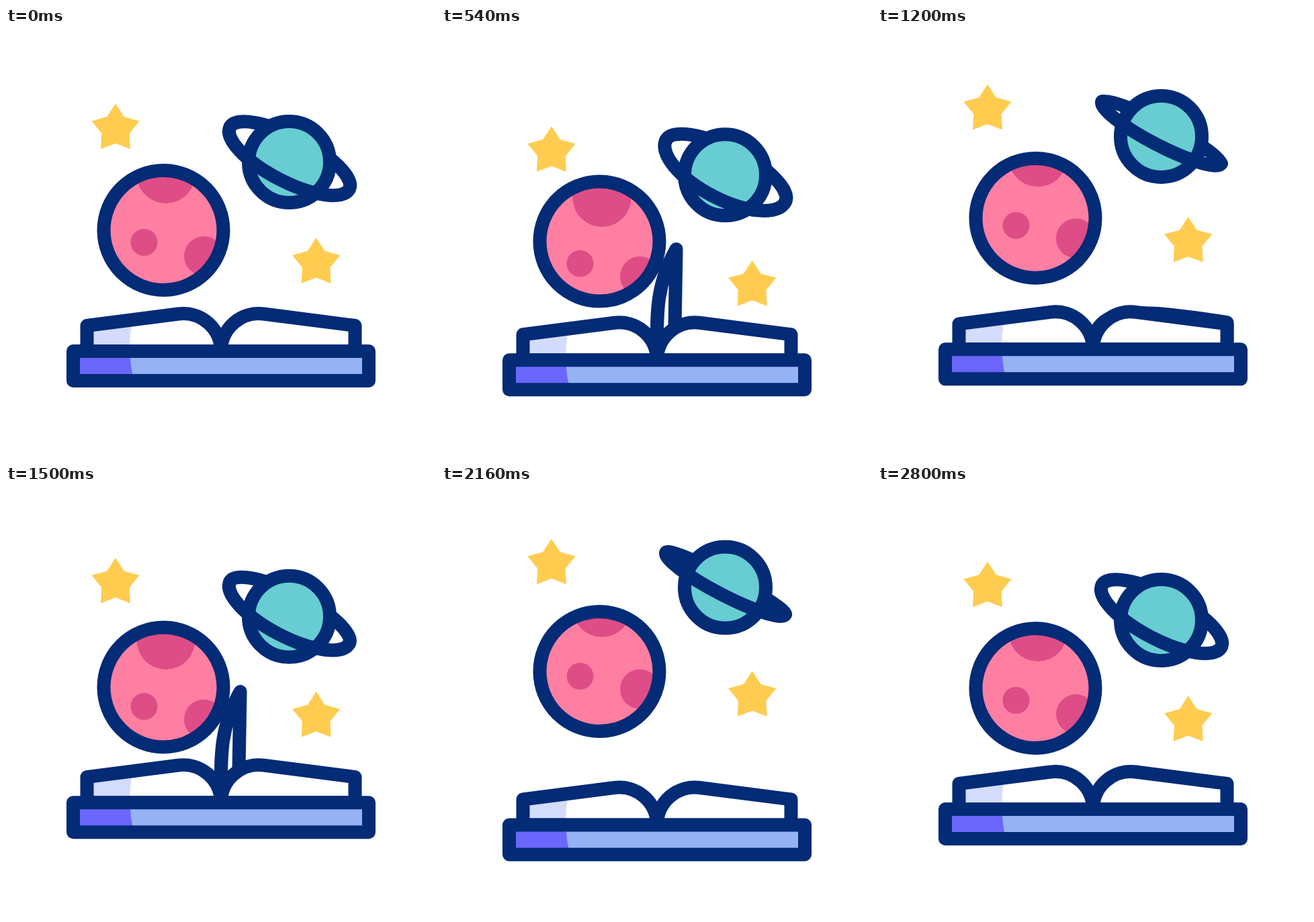
An HTML page for the animation above (2960 ms loop, 640x640 px).

```html
<!DOCTYPE html>
<html lang="en">
<head>
<meta charset="utf-8">
<title>Space book</title>
<style>
  html, body { margin: 0; width: 100%; height: 100%; overflow: hidden; background: #fff; }
  svg { display: block; width: 100%; height: 100%; }
  .line { stroke: #032b76; stroke-width: 20; stroke-linejoin: round; stroke-linecap: round; }
  .none { fill: none; }
  .white { fill: #fff; }
  .star { fill: #ffcc50; }
  .spot { fill: #de4d86; }
</style>
</head>
<body>
<svg viewBox="0 0 640 640">
  <defs>
    <clipPath id="disc"><circle cx="234.5" cy="301" r="82"/></clipPath>
    <path id="page" d="M120.5 481V443L256.7 425.5A56 56 0 0 1 320 481Z"/>
  </defs>

  <polygon id="starL" class="star"/>
  <polygon id="starR" class="star"/>

  <g id="saturn">
    <g class="line none" transform="translate(422.2 193.5) rotate(27.5)">
      <path id="ringBack"/>
    </g>
    <circle cx="421.5" cy="199.5" r="60.5" class="line" fill="#67cdd2"/>
    <g class="line none" transform="translate(422.2 193.5) rotate(27.5)">
      <path id="ringFront"/>
    </g>
  </g>

  <g id="planet">
    <circle cx="234.5" cy="301" r="89" fill="#ff7fa2"/>
    <g clip-path="url(#disc)">
      <circle id="spotTop" class="spot" cx="238" cy="217.5" r="43.5"/>
      <circle id="spotLeft" class="spot" cx="205.5" cy="319" r="20"/>
      <circle id="spotRight" class="spot" cx="294.5" cy="339.5" r="29.5"/>
    </g>
    <circle cx="234.5" cy="301" r="89" class="line none"/>
  </g>

  <g id="book">
    <path id="leaf" class="line white"/>
    <use href="#page" class="white"/>
    <path d="M120.5 481V443L187 434V443Q183.5 462 184.7 481Z" fill="#d3dcfd"/>
    <use href="#page" class="line none"/>
    <use href="#page" class="line white" transform="matrix(-1 0 0 1 640 0)"/>
    <rect x="100" y="481" width="440" height="44" fill="#95b2f4"/>
    <path d="M100 481H185V491Q185.5 504 188.3 515V525H100Z" fill="#6a66fb"/>
    <rect x="100" y="481" width="440" height="44" class="line none"/>
  </g>
</svg>

<script>
const LOOP = 2960, END = 2800;
const BEATS = [190, 470, 970, 1600, 2090, 2730];   // rest, low, high, dip, high, rest
const BOOK = [[190, 0], [370, 14.2], [1790, -12.5], [2080, 26], [2480, 0]];
const FLIPS = [210, 1170], FLIP_TIME = 660;

// Turning page: curve handle, far corner, lower corner, base
const RIGHT = [[380, 420], [519.5, 443], [519.5, 481], [340, 481]];
const UP = [[317, 372], [350.3, 316], [350.3, 316], [346, 481]];
const LEFT = RIGHT.map(([x, y]) => [640 - x, y]);

const el = id => document.getElementById(id);
const mix = (a, b, k) => a + (b - a) * k;
const ease = k => 0.5 - 0.5 * Math.cos(Math.PI * k);
const shift = (id, y) => el(id).setAttribute('transform', `translate(0 ${y.toFixed(2)})`);

// Sine-eased value through [time, value] keys
function through(keys, t) {
  const i = keys.findIndex(([time]) => t < time);
  if (i === 0) return keys[0][1];
  if (i < 0) return keys[keys.length - 1][1];
  const [[t0, a], [t1, b]] = [keys[i - 1], keys[i]];
  return mix(a, b, ease((t - t0) / (t1 - t0)));
}

// Floating motion: later parts follow the same beats with a delay
function float(t, delay, low, high, dip = 0, rest = 0) {
  const values = [rest, low, high, dip, high, rest];
  return through(BEATS.map((b, i) => [Math.min(b + delay, END), values[i]]), t);
}

function starPoints(cx, cy) {
  return Array.from({ length: 10 }, (_, i) => {
    const r = i % 2 ? 21.8 : 37.4, a = Math.PI * (i / 5 - 0.5);
    return (cx + r * Math.cos(a)).toFixed(2) + ',' + (cy + r * Math.sin(a)).toFixed(2);
  }).join(' ');
}

function drawRing(t) {
  const back = float(t, 105, 34, 10, 34, 32);
  const front = float(t, 105, 42, 17, 42, 35);
  el('ringBack').setAttribute('d', `M-100 0A100 ${back} 0 0 1 100 0`);
  el('ringFront').setAttribute('d', `M100 0A100 ${front} 0 0 1 -100 0`);
}

// The far corner swings up and over on quarter arcs
function drawLeaf(t) {
  const start = FLIPS.find(s => t > s && t < s + FLIP_TIME);
  const leaf = el('leaf');
  leaf.style.display = start === undefined ? 'none' : '';
  if (start === undefined) return;
  const p = 2 * ease((t - start) / FLIP_TIME);
  const rising = p < 1;
  const angle = (p % 1) * Math.PI / 2;
  const slow = 1 - Math.cos(angle), fast = Math.sin(angle);
  const [from, to] = rising ? [RIGHT, UP] : [UP, LEFT];
  const [bend, tip, low, base] = from.map(([x, y], i) => [
    mix(x, to[i][0], rising ? slow : fast),
    mix(y, to[i][1], rising ? fast : slow)
  ]);
  leaf.setAttribute('d', `M320 481C320 416 ${bend} ${tip}L${low} ${base}Z`);
}

function draw(t) {
  shift('planet', float(t, 0, 18.8, -25.7));
  shift('saturn', float(t, 35, 20.2, -48.8));
  shift('starL', float(t, 70, 33.7, -34));
  shift('starR', float(t, 70, 33.7, -37));
  shift('spotTop', float(t, 70, 18.4, -11.2, 18.4));
  shift('spotLeft', float(t, 70, 15, -11, 15));
  shift('spotRight', float(t, 70, 13.5, -12.3, 13.5));
  shift('book', through(BOOK, t));
  drawRing(t);
  drawLeaf(t);
}

el('starL').setAttribute('points', starPoints(163, 150));
el('starR').setAttribute('points', starPoints(461.7, 349.7));

const begin = performance.now();
function tick() {
  draw((performance.now() - begin) % LOOP);
  requestAnimationFrame(tick);
}
tick();
</script>
</body>
</html>
```
